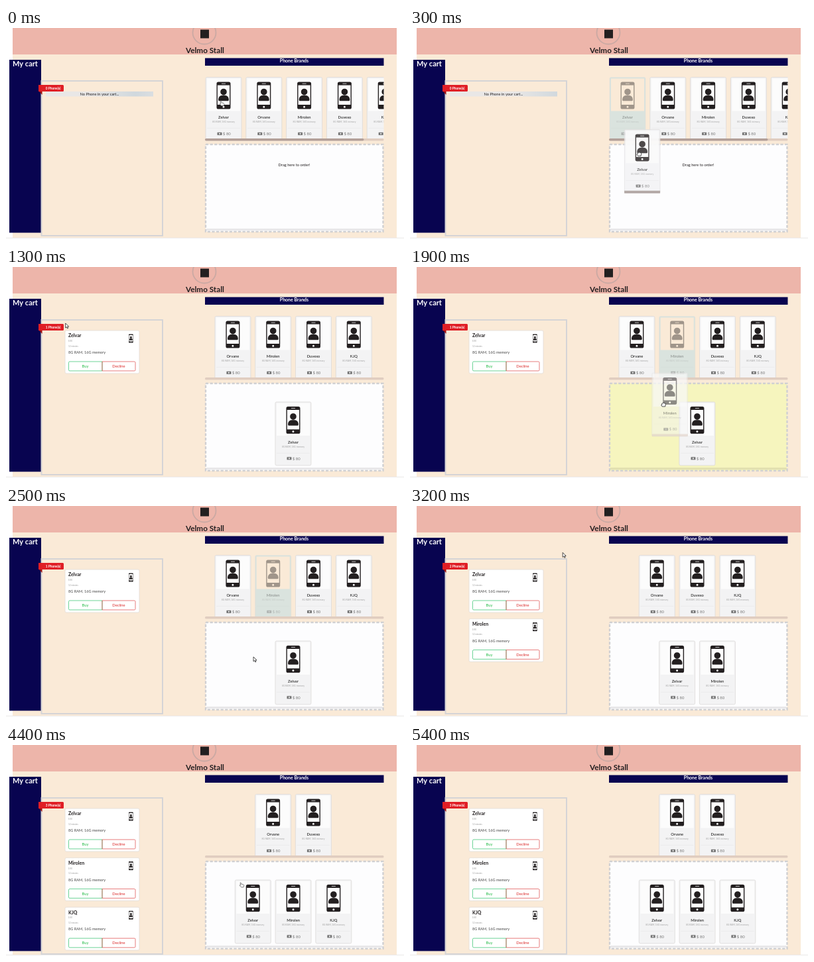
Write an HTML page with a canvas that moves like this. It is 600 by 319 pixels and loops after 5.5 s.

```html
<!DOCTYPE html>
<html lang="en">
<head>
<meta charset="utf-8">
<title>Phone cart</title>
<style>
html, body { margin: 0; width: 100%; height: 100%; overflow: hidden; background: #fff; }
canvas { display: block; width: 600px; height: 319px; }
</style>
</head>
<body>
<canvas id="stage"></canvas>
<script>
const LOOP = 5500, STEP = 100, HOLD = 900;
const NAVY = '#080450', CREAM = '#faead7', GREY = '#d5d4d6', INK = '#231f20';
const SHELF_Y = 74.5, ZONE_Y = 204;
const BRANDS = ['Zelvar', 'Orvane', 'Mirolen', 'Duvexo', 'KJQ'];
const SPEC = '8G RAM, 16G memory';

// grip: pointer offset inside the grabbed card; goal: where it is released
const DRAGS = [
  { brand: 'Zelvar', grab: 100, grip: [22, 36], goal: [379, 235], alpha: .8 },
  { brand: 'Mirolen', grab: 1600, grip: [17, 47], goal: [373, 228], alpha: .5 },
  { brand: 'KJQ', grab: 3400, grip: [8, 47], goal: [353, 208], alpha: .75 },
];

const canvas = document.getElementById('stage');
const ctx = canvas.getContext('2d');
const dpr = window.devicePixelRatio || 1;
canvas.width = 600 * dpr;
canvas.height = 319 * dpr;

const mix = (a, b, k) => a + (b - a) * k;
const easeOut = (k, power) => 1 - (1 - k) ** power;

// Cards are centred in their row until it overflows
function layout(names, y) {
  const left = Math.max(301, 436.3 - names.length * 30.35);
  return names.map((name, i) => ({ name, x: left + i * 60.8, y }));
}

DRAGS.forEach((drag, i) => {
  const sold = DRAGS.slice(0, i).map(d => d.brand);
  const shelf = layout(BRANDS.filter(b => !sold.includes(b)), SHELF_Y);
  drag.card = shelf.find(c => c.name === drag.brand);
  drag.from = [drag.card.x + drag.grip[0], drag.card.y + drag.grip[1]];
  drag.drop = drag.grab + HOLD;
  drag.done = drag.drop + STEP;
});

function rect(x, y, w, h, fill) {
  ctx.fillStyle = fill;
  ctx.fillRect(x, y, w, h);
}

function box(x, y, w, h, r, fill, stroke, width = 1) {
  ctx.beginPath();
  ctx.roundRect(x, y, w, h, r);
  if (fill) { ctx.fillStyle = fill; ctx.fill(); }
  if (stroke) { ctx.strokeStyle = stroke; ctx.lineWidth = width; ctx.stroke(); }
}

function text(str, x, y, size, fill = INK, weight = 400, align = 'center') {
  ctx.font = `${weight} ${size}px Lato, sans-serif`;
  ctx.textAlign = align;
  ctx.fillStyle = fill;
  ctx.fillText(str, x, y);
}

function at(x, y, scale, alpha, draw) {
  ctx.save();
  ctx.translate(x, y);
  ctx.scale(scale, scale);
  ctx.globalAlpha *= alpha;
  draw();
  ctx.restore();
}

function clipped(x, y, w, h, draw) {
  ctx.save();
  ctx.beginPath();
  ctx.rect(x, y, w, h);
  ctx.clip();
  draw();
  ctx.restore();
}

// One path with holes, so that it stays even when translucent
function phone() {
  const shape = new Path2D();
  shape.roundRect(0, 0, 21, 41, 2.6);
  shape.rect(1.4, 5, 18.2, 29.5);
  shape.rect(7.5, 2.2, 6, .9);
  shape.roundRect(9, 36.3, 3, 3, 1.5);
  shape.roundRect(5.7, 10.2, 9.6, 9.8, 4.8);
  shape.roundRect(2.6, 20.3, 15.8, 8.4, [6, 6, 1.5, 1.5]);
  ctx.fillStyle = INK;
  ctx.fill(shape, 'evenodd');
}

function card({ name, x, y }, alpha = 1, faded = false) {
  at(x, y, 1, alpha, () => {
    box(0, 0, 54, 96, 2, faded ? '#add8e6' : '#f3f3f4', '#dcdad9', .8);
    if (!faded) rect(2, 2, 50, 49, '#fcfcfc');
  });
  if (faded) rect(x + 2, y + 2, 50, 49, CREAM);
  at(x, y, 1, alpha, () => {
    at(16.5, 7, 1, 1, phone);
    text(name, 27, 62.6, 5.8, '#222', 500);
    text(SPEC, 27, 68.8, 3.4, '#a3a3a3');
    rect(2, 77, 50, .5, 'rgba(0,0,0,.06)');
    box(17.5, 83.3, 7, 4.2, .6, '#777');
    box(20, 84.3, 2, 2.2, 1, '#eee');
    text('$ 80', 26, 87.5, 5.9, '#777', 400, 'left');
  });
}

function cartItem(name, y) {
  box(89, y, 112, 65, 2, '#fff', '#e2dcd6', .8);
  text(name, 94, y + 10.4, 7, INK, 700, 'left');
  text('$ 80', 94, y + 17, 3, '#999', 400, 'left');
  text('12 minutes', 94, y + 24.6, 3, '#999', 400, 'left');
  text(SPEC, 94, y + 35, 5.6, '#444', 400, 'left');
  at(185, y + 5.5, .32, 1, phone);
  box(94.5, y + 47, 50.5, 14, [1.5, 0, 0, 1.5], null, '#2fc06a', .7);
  box(145, y + 47, 50, 14, [0, 1.5, 1.5, 0], null, '#dd4444', .7);
  text('Buy', 119.5, y + 56, 5.8, '#21ba45');
  text('Decline', 170, y + 56, 5.8, '#db2828');
}

function header() {
  rect(0, 0, 600, 319, '#fff');
  rect(10, 0, 579, 40, '#edb5aa');
  rect(10, 40, 579, 277, CREAM);
  rect(0, 317, 600, .8, '#e6e4e3');
  box(281.5, -10.5, 35, 35, 17.5, null, '#cba9a3', 1.8);
  rect(293, 2.5, 13, 13, INK);
  text('Velmo Stall', 300, 37.8, 11.7, INK, 700);
  rect(300, 45.5, 269.5, 11.5, NAVY);
  text('Phone Brands', 434.5, 52, 7, '#fff', 700);
}

function cart(t, ordered) {
  const count = ordered.length, extra = count > 2 ? 2 : 0;
  rect(5, 48, 48, 261.5 + extra, NAVY);
  text('My cart', 29, 58, 11, '#fff', 700);
  box(53.5, 80, 182.5, 234 + extra, 0, null, GREY, 2);
  ordered.forEach((name, i) => cartItem(name, 96 + i * 74.6));
  if (!count) {
    const peak = 60 + (135 + t * .1) % 200;
    const shine = ctx.createLinearGradient(peak - 70, 0, peak + 70, 0);
    shine.addColorStop(0, '#e9e7e6');
    shine.addColorStop(.5, '#d0d8dd');
    shine.addColorStop(1, '#e9e7e6');
    rect(60, 96, 162, 7.5, shine);
    text('No Phone in your cart...', 141, 101.7, 5.7);
  }
  ctx.fillStyle = '#a01010';
  ctx.fill(new Path2D('M49 95H54.5V101Z'));
  box(49, 86, 38, 10, [0, 1.5, 1.5, 0], '#e01e25');
  text(`${count} Phone(s)`, 71, 92.6, 4.9, '#fff', 700);
}

function shelf(cards, active) {
  clipped(299, 70, 270.5, 97, () => cards.forEach(c => {
    const faded = active && active.brand === c.name;
    card(c, faded ? .42 : 1, faded);
  }));
  box(300, 167, 269.5, 3.6, 1.5, '#e0cdc0');
  if (cards.length > 4) box(300, 167, 239.5, 3.6, 1.8, '#b3a099');
}

function zone(cards, over) {
  rect(301, 176, 267.5, 132, over ? '#f6f5be' : '#fdfdfe');
  rect(302, 303.3, 265.5, 3, 'rgba(60,50,60,.11)');
  ctx.setLineDash([4.2, 2.4]);
  box(301, 176, 267.5, 132, 0, null, '#d0d0d2', 2.4);
  ctx.setLineDash([]);
  if (!cards.length) text(over ? 'Humm, phone!' : 'Drag here to order!', 434.5, 209, 5.7);
  cards.forEach(c => card(c));
}

// The dragged picture includes the strip of scrollbar below the card
function ghost({ brand, grip, alpha }, px, py, bar) {
  const x = px - grip[0], y = py - grip[1];
  clipped(x - .5, y - .5, 55, 97, () => {
    card({ name: brand, x, y }, alpha);
    ctx.globalAlpha = alpha;
    rect(x, y + 92.5, 54, 4, bar);
  });
}

const POINTERS = {
  arrow: 'M0 0V7L1.7 5.6 2.8 8 4 7.4 2.9 5.1H5Z',
  hand: 'M0 .4Q.8-.4 1.4.6L2 2.4 5 3Q6 3.3 5.7 5L5 7H1.6L-1 4.2Q-.8 3.3.8 4Z',
  grab: 'M-2-.5Q0-2 1.5-1.2 3.5-1.4 3.6.5L3 4H-1.6L-3 2Q-3 1-1.8 1.2Z',
};

function pointer(x, y, kind) {
  at(x, y, 1, 1, () => {
    const shape = new Path2D(POINTERS[kind]);
    ctx.fillStyle = '#fff';
    ctx.fill(shape);
    ctx.strokeStyle = kind === 'hand' ? '#666' : '#222';
    ctx.lineWidth = .8;
    ctx.stroke(shape);
  });
}

// Down into the zone while holding, then a swoop past the cart to the next card
function position(t) {
  const i = DRAGS.findLastIndex(d => t >= d.grab);
  if (i < 0) return DRAGS[0].from;
  const { from, goal, grab, drop, done } = DRAGS[i];
  if (t < drop) {
    const k = (t - grab) / HOLD;
    return [mix(from[0], goal[0], easeOut(k, 2)), mix(from[1], goal[1], easeOut(k, 4))];
  }
  const next = DRAGS[i + 1] || { from: DRAGS[0].from, grab: LOOP };
  const k = Math.max(0, (t - done) / (next.grab - done));
  const swing = Math.sin(Math.PI * k);
  return [
    mix(goal[0], next.from[0], k) - 310 * swing,
    mix(goal[1], next.from[1], k) - 110 * swing,
  ];
}

function frame(now) {
  const t = Math.floor(now % LOOP / STEP) * STEP;
  const ordered = DRAGS.filter(d => t >= d.done).map(d => d.brand);
  const onShelf = layout(BRANDS.filter(b => !ordered.includes(b)), SHELF_Y);
  const inZone = layout(ordered, ZONE_Y);
  const active = DRAGS.find(d => t >= d.grab && t < d.done);
  const held = active && t < active.drop;
  const [x, y] = position(t);

  ctx.setTransform(dpr, 0, 0, dpr, 0, 0);
  header();
  cart(t, ordered);
  shelf(onShelf, active);
  zone(inZone, held && y > 190);
  if (held) ghost(active, x, y, onShelf.length > 4 ? '#a79a96' : '#dccabd');

  const hover = [...onShelf, ...inZone].some(c => x > c.x && x < c.x + 54 && y > c.y && y < c.y + 96);
  if (t < LOOP - STEP) pointer(x, y, held ? 'grab' : hover ? 'hand' : 'arrow');
  requestAnimationFrame(frame);
}
requestAnimationFrame(frame);
</script>
</body>
</html>
```
